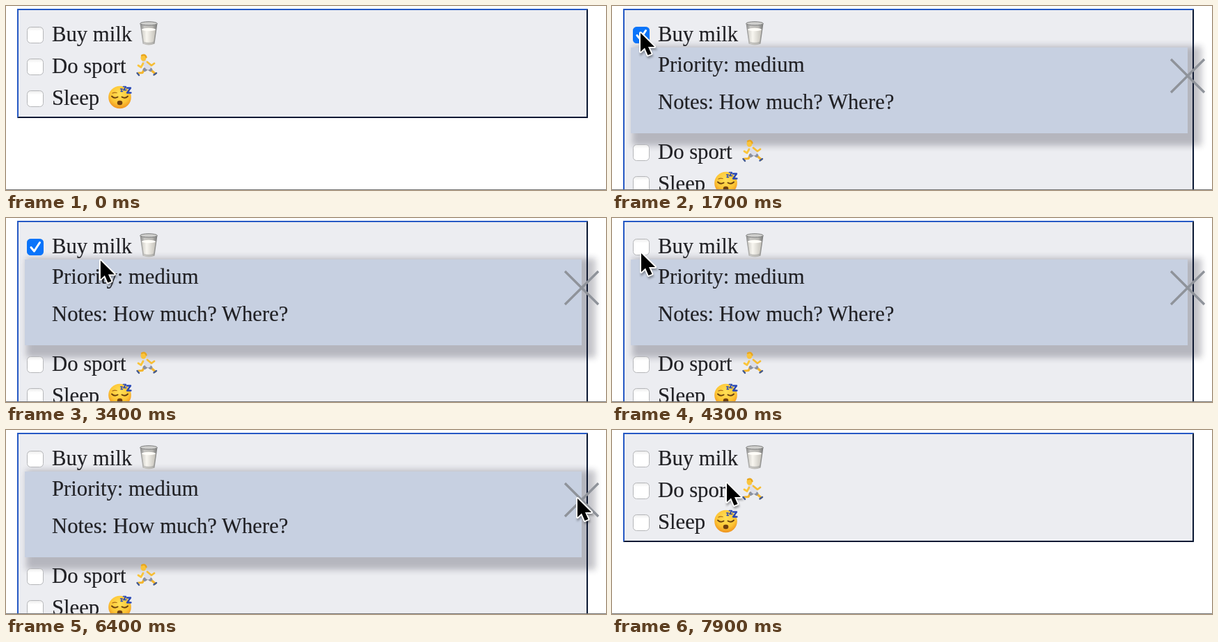
These frames come from a looping animation (862x266 px, 8000 ms). An HTML page:

```html
<!DOCTYPE html>
<html lang="en">
<head>
<meta charset="utf-8">
<title>To-do list</title>
<style>
  html, body { margin: 0; width: 100%; height: 100%; overflow: hidden; background: #fff; }
  svg { display: block; width: 862px; height: 266px; }
  text { font: 30.7px "Liberation Serif", "Times New Roman", serif; fill: #202024; stroke: #202024; stroke-width: .15px; }
  .line { fill: none; stroke-linecap: round; stroke-linejoin: round; }
</style>
</head>
<body>
<svg viewBox="0 0 862 266">
  <defs>
    <filter id="blur" x="-5%" y="-20%" width="110%" height="140%"><feGaussianBlur stdDeviation="5"/></filter>
    <filter id="soft" x="-50%" y="-50%" width="200%" height="200%"><feGaussianBlur stdDeviation="1.5"/></filter>
    <linearGradient id="boxFill" x2="0" y2="1">
      <stop offset="0" stop-color="#ececec"/><stop offset=".25" stop-color="#fff"/>
    </linearGradient>
    <linearGradient id="glassFill">
      <stop offset="0" stop-color="#858686"/><stop offset=".25" stop-color="#c6c5c2"/>
      <stop offset=".7" stop-color="#b9b8b4"/><stop offset="1" stop-color="#747575"/>
    </linearGradient>
    <linearGradient id="milkFill">
      <stop offset="0" stop-color="#cfcdc7"/><stop offset=".35" stop-color="#f8f6f0"/><stop offset="1" stop-color="#c5c2ba"/>
    </linearGradient>
    <radialGradient id="faceFill" cx=".5" cy=".35" r=".65">
      <stop offset="0" stop-color="#ffe158"/><stop offset=".65" stop-color="#fdc535"/><stop offset="1" stop-color="#ee9220"/>
    </radialGradient>
    <rect id="box" x="30.5" y="30.5" width="23" height="23" rx="5" fill="url(#boxFill)" stroke="#b5b6b9"/>
    <path id="arrow" d="M0 0V27L6 21.5L10.5 32L15.5 30L11 20H20Z"/>
  </defs>

  <rect x="16" y="4" width="820" fill="#ecedf1" id="back"/>
  <path fill="#2558c4" id="light"/>
  <path fill="#0a1833" id="dark"/>

  <g id="panel">
    <rect x="29" y="58" width="818" height="144" fill="#12142a" opacity=".25" filter="url(#blur)"/>
    <rect x="27" y="60" width="800" height="124" fill="#c7d0e1"/>
    <text x="66" y="95">Priority: medium</text>
    <text x="66" y="149">Notes: How much? Where?</text>
    <path d="M803 77L851 125M803 125L851 77" stroke="#8f939a" stroke-width="3.4" fill="none"/>
  </g>

  <use href="#box"/>
  <g id="check">
    <rect x="30" y="30" width="24" height="24" rx="5.5" fill="#0a74fa"/>
    <path class="line" d="M36 42.5L40.5 48L48.5 35.5" stroke="#fff" stroke-width="3"/>
  </g>
  <text x="66" y="51">Buy milk</text>
  <!-- glass of milk -->
  <g>
    <path d="M192.5 25L196.5 54.5Q205 58.5 213.5 54.5L217.5 25Z" fill="url(#glassFill)"/>
    <path d="M195 34L198 51.5Q205 54 212 51.5L215 34Z" fill="url(#milkFill)"/>
    <ellipse cx="205" cy="34" rx="10" ry="2.2" fill="#fffdf8"/>
    <ellipse cx="205" cy="25.3" rx="12.3" ry="2.6" fill="#cfcfcd" stroke="#7c7d7d" stroke-width="1"/>
  </g>

  <g id="rest">
    <use href="#box" y="46"/>
    <text x="66" y="97">Do sport</text>
    <!-- runner -->
    <g class="line">
      <path d="M199 91L196 96.5L190 97" stroke="#f3b52d" stroke-width="3.2"/>
      <path d="M206 92L210 94L214.5 98" stroke="#f3b52d" stroke-width="3.2"/>
      <path d="M188.5 97L191 100M212.5 99.5L216 97" stroke="#435a91" stroke-width="2.4"/>
      <path d="M204 89L199.5 92M204 89L207.5 92" stroke="#8a90a0" stroke-width="5.5"/>
      <path d="M199.5 82L204 88" stroke="#dcdee9" stroke-width="8.5"/>
      <path d="M203 81L209 86L213 83" stroke="#f6bd35" stroke-width="2.8"/>
      <path d="M197 83L194 88.5L190 86" stroke="#fac53a" stroke-width="2.8"/>
      <ellipse cx="197.5" cy="75" rx="4" ry="4.8" fill="#fac43c"/>
      <path d="M195 71.5Q200 69 201.5 74" stroke="#e8a51d" stroke-width="2.4"/>
    </g>
    <use href="#box" y="92"/>
    <text x="66" y="143">Sleep</text>
    <!-- sleeping face -->
    <g class="line">
      <circle cx="163.5" cy="132" r="16.3" fill="url(#faceFill)"/>
      <path d="M152 130.5Q156 134.5 160.5 131.5M166.5 131.5Q171 134.5 175 130.5" stroke="#69400f" stroke-width="1.9"/>
      <path d="M153 126Q156 124.5 159 125.5" stroke="#a86a17" stroke-width="1.3"/>
      <ellipse cx="163.5" cy="140" rx="3.8" ry="3.3" fill="#70400f"/>
      <g stroke="#2747b5">
        <path d="M173.5 118.5H179L174 125.5H179.5" stroke-width="2.3"/>
        <path d="M168.5 116.5H172.2L169 121.5H172.6" stroke-width="1.7"/>
        <path d="M164.5 120H167.2L165 123.5H167.6" stroke-width="1.3"/>
      </g>
    </g>
  </g>

  <rect y="265" width="862" height="1" fill="#747474"/>

  <g id="cursor">
    <use href="#arrow" x="1" y="3" opacity=".35" stroke="#000" stroke-width="3" filter="url(#soft)"/>
    <use href="#arrow" stroke="#fff" stroke-width="4" stroke-linejoin="round"/>
    <use href="#arrow"/>
  </g>
</svg>
<script>
  const LOOP = 8000, STEP = 100, PANEL_H = 124;
  const OPEN = 1700, UNCHECK = 4000, CLOSE = 6800;
  const $ = id => document.getElementById(id);
  const easeOut = p => 1 - (1 - p) ** 2;

  // where the pointer rests, and when it sets off and arrives
  const ENTRY = { x: 395, y: 302 };
  const moves = [
    { from: 0, to: 900, x: 129, y: 53 },      // into view
    { from: 900, to: 1500, x: 41, y: 39 },    // first checkbox
    { from: 2300, to: 2700, x: 752, y: 182 }, // across the panel
    { from: 2700, to: 3800, x: 42, y: 43 },   // back to the checkbox
    { from: 3900, to: 4300, x: 42, y: 51 },
    { from: 4800, to: 5200, x: 870, y: 110 }, // out on the right
    { from: 5500, to: 5700, x: 847, y: 102 },
    { from: 6100, to: 6400, x: 821, y: 99 },  // close cross
    { from: 7100, to: 7900, x: 165, y: 77 }   // second item
  ];

  function pointer(t) {
    let { x, y } = ENTRY;
    for (const m of moves) {
      const p = easeOut(Math.min(1, Math.max(0, (t - m.from) / (m.to - m.from))));
      x += (m.x - x) * p;
      y += (m.y - y) * p;
    }
    return [x, y];
  }

  const show = (id, on) => $(id).setAttribute("display", on ? "inline" : "none");
  const move = (id, x, y) => $(id).setAttribute("transform", `translate(${x} ${y})`);

  function draw(ms) {
    const t = Math.floor((ms % LOOP) / STEP) * STEP;
    const open = t >= OPEN && t < CLOSE;
    const shift = open ? PANEL_H : 0, bottom = 162 + shift;

    $("back").setAttribute("height", bottom - 4);
    $("light").setAttribute("d", `M16 ${bottom}V4H836L834 6H18V${bottom - 2}Z`);
    $("dark").setAttribute("d", `M836 4V${bottom}H16L18 ${bottom - 2}H834V6Z`);
    show("panel", open);
    show("check", t >= OPEN && t < UNCHECK);
    move("rest", 0, shift);
    move("cursor", ...pointer(t));
  }

  const start = performance.now();
  function loop() {
    draw(performance.now() - start);
    requestAnimationFrame(loop);
  }
  loop();
</script>
</body>
</html>
```
